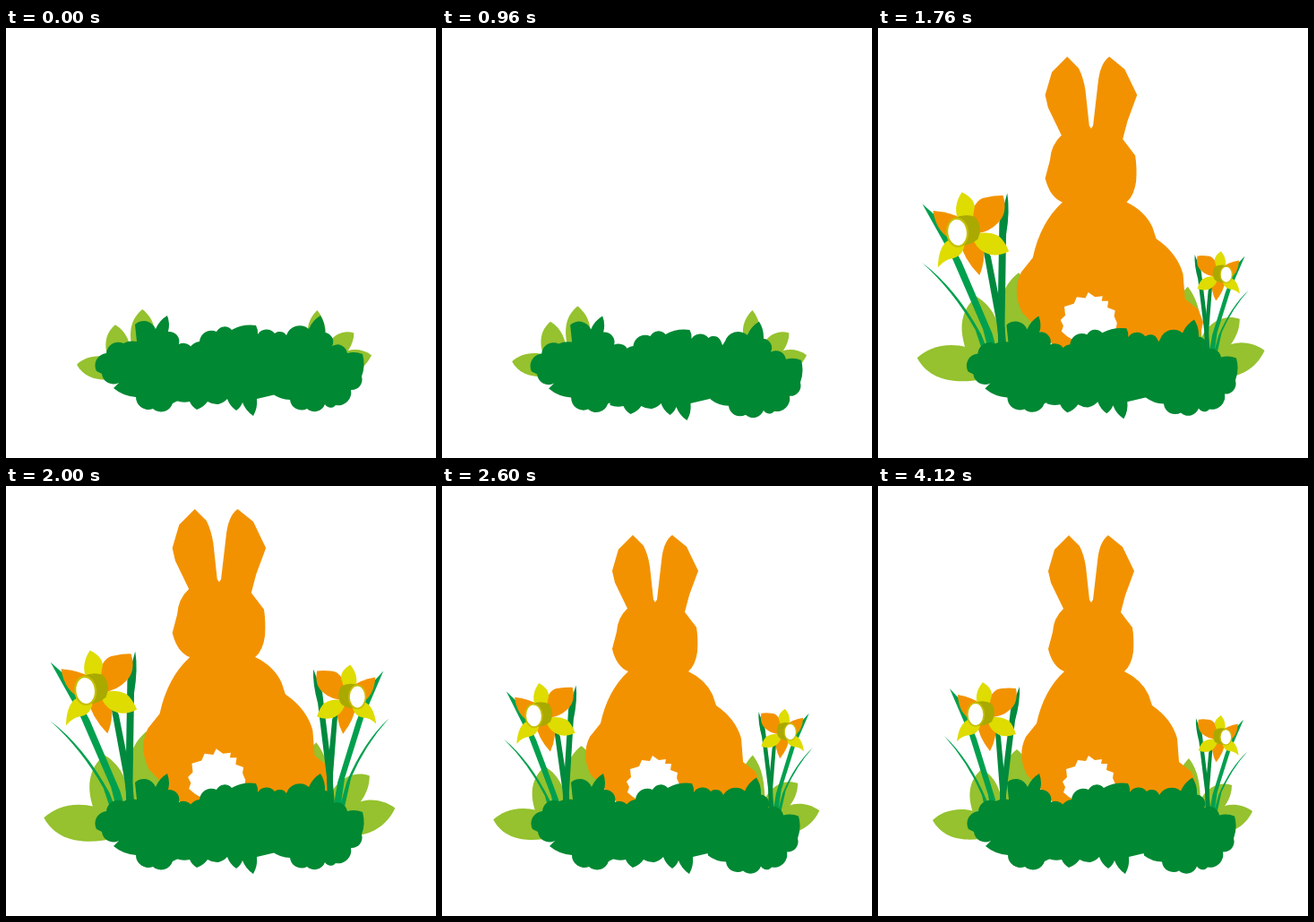
An HTML page for the animation above (4160 ms loop, 480x480 px).

```html
<!DOCTYPE html>
<html lang="en">
<head>
<meta charset="utf-8">
<title>Spring bunny</title>
<style>
  html, body { margin: 0; height: 100%; overflow: hidden; background: #fff; }
  svg { display: block; width: 100vw; height: 100vh; }
</style>
</head>
<body>
<svg viewBox="0 0 480 480">
  <defs>
    <g id="flower">
      <g fill="#00a04e">
        <path d="M80 226L93 240L110 282L131 350L138 392H130L123 345L101 275Z"/>
        <path d="M74 279Q102 305 121 350L132 390H126L116 345Q100 308 74 279Z"/>
      </g>
      <g fill="#008a3e">
        <path d="M158 224Q159 240 153 262L143 345L139 390H133L137 340L148 250Z"/>
        <path d="M130 262L137 280L143 345L142 390H137L136 340Z"/>
      </g>
      <g fill="#f39200">
        <path d="M120 250Q126 226 138 226Q147 225 154 226Q157 242 147 250Q138 258 125 258Z"/>
        <path d="M89 233Q106 236 116 244L105 262Q90 254 89 233Z"/>
        <path d="M110 262Q112 280 125 296Q134 280 131 258Z"/>
      </g>
      <g fill="#dedc00">
        <path d="M112 247Q106 232 117 219Q128 226 127 234L123 248Z"/>
        <path d="M122 260Q134 255 146 262Q151 267 154 277Q141 282 132 276Q124 271 122 260Z"/>
        <path d="M88 285Q91 262 104 260L115 262Q114 276 103 278Q95 278 88 285Z"/>
      </g>
      <path fill="#aaa900" d="M107 242Q118 238 127 243Q133 253 127 263Q119 269 108 267Z"/>
      <ellipse cx="109" cy="255" rx="9.3" ry="12.8" fill="#fff" stroke="#c6bf00" stroke-width="1.8"/>
    </g>
  </defs>
  <g fill="#95c22e">
    <g id="leavesL">
      <path d="M61 373C74 361 97 355 125 370V392C102 397 74 397 61 373Z"/>
      <path d="M116 316C102 328 98 345 108 370L140 365C138 340 132 326 116 316Z"/>
      <path d="M155 294C140 306 132 325 143 360H165C180 330 172 308 155 294Z"/>
    </g>
    <g id="leavesR">
      <path d="M347 304C333 318 330 335 342 360H360C360 335 358 318 347 304Z"/>
      <path d="M395 334C375 327 355 345 355 372H372C385 362 395 350 395 334Z"/>
      <path d="M418 363C398 349 375 357 365 375L380 388C400 387 412 376 418 363Z"/>
    </g>
  </g>
  <g id="rabbit">
    <path fill="#f39200" d="M213 55L225 67Q230 77 232 90L236 127L238 130L240 127L245 84Q247 62 257 55L273 68L286 95L276 122L271 141L284 158Q286 170 285 185Q283 200 275 207Q294 216 302 233L306 245Q328 260 334 282L336 308L350 319L355 332L348 365H210L200 358L166 322Q155 300 165 280L177 265Q185 228 208 207Q195 202 190 182L195 163Q196 147 207 137L193 108L190 95L197 71Z"/>
    <path fill="#fff" d="M213 347L207 342L209 336L206 330L211 325L210 316L220 313L223 306L232 307L235 301L242 306L250 305L249 310L256 310L255 317L263 320L262 326L265 333L262 350H218Z"/>
  </g>
  <use id="flowerL" href="#flower"/>
  <g id="flowerR"><use href="#flower" transform="matrix(-.68 0 0 .68 462.4 107)"/></g>
  <g id="bush" fill="#008833"></g>
</svg>
<script>
const $ = id => document.getElementById(id);
const LOOP = 4160, STEP = 40;

// Outward arcs between notches; "~" marks a flatter edge, "-" a straight one.
function scallop(points) {
  const list = points.split(' ').map(p => {
    const [x, y] = p.replace(/[~-]/, '').split(',').map(Number);
    return { x, y, bend: p.includes('-') ? 0 : p.includes('~') ? 1.6 : 0.6 };
  });
  let prev = list[list.length - 1];
  let d = `M${prev.x} ${prev.y}`;
  for (const p of list) {
    const r = Math.hypot(p.x - prev.x, p.y - prev.y) * p.bend;
    d += `A${r} ${r} 0 0 1 ${p.x} ${p.y}`;
    prev = p;
  }
  const path = document.createElementNS('http://www.w3.org/2000/svg', 'path');
  path.setAttribute('d', d + 'Z');
  return $('bush').appendChild(path);
}

const bushL = scallop('101,383- 112,363 131,352 146,350~ 144,331- 167,336 180,321~ 181,339~ 193,353 209,362 ' +
  '225,368- 225,400- 190,417- 186,419- 164,425 145,412 120,402~ 126,396- 107,386');
const bushM = scallop('205,372- 216,350 235,339 252,337 279,332~ 281,342~ 300,341 314,345 ' +
  '325,375- 318,405- 297,410- 280,414- 276,433~ 264,418~ 257,427~ 247,414~ 237,420~ 225,417~ ' +
  '213,426~ 205,417~ 190,416~ 190,375-');
const bushR = scallop('313,343- 338,336 351,321~ 356,340~ 364,355 381,363 398,364~ 397,389~ ' +
  '385,404 368,421 356,420 336,425 317,415 297,408~ 292,375-');

// Interpolates [time, value] keys with a sine ease.
function tween(t, ...keys) {
  if (t <= keys[0][0]) return keys[0][1];
  for (let i = 1; i < keys.length; i++) {
    const [t0, a] = keys[i - 1], [t1, b] = keys[i];
    if (t < t1) return a + (b - a) * (1 - Math.cos(Math.PI * (t - t0) / (t1 - t0))) / 2;
  }
  return keys[keys.length - 1][1];
}

const set = (el, value) => el.setAttribute('transform', value);
const move = (x, y) => `translate(${x} ${y})`;
const grow = (x, y, s) => `translate(${x} ${y}) scale(${s}) translate(${-x} ${-y})`;
const turn = (x, y, angle) => `rotate(${angle} ${x} ${y})`;

function draw(t) {
  // The bush rustles until the bunny is up.
  const shake = Math.max(0, Math.min(1, t / 300, (1960 - t) / 300));
  const wave = Math.sin(2 * Math.PI * t / 400);
  set(bushL, move(shake * (1.6 * wave - 1.8), shake * (1.9 * wave - 0.5)));
  set(bushM, move(-2.5 * shake, 5 * shake));
  set(bushR, move(shake * 5 * wave, shake * (6.5 + wave / 2) + tween(t, [2000, 0], [2200, 4.5])));

  set($('leavesL'), move(shake * (wave - 1.5), shake * (wave - 4)) +
    grow(143, 385, tween(t, [1350, 0.78], [1850, 1.24], [2900, 1])));
  set($('leavesR'), move(shake * (wave - 1.5), 0) +
    grow(350, 378, tween(t, [1350, 0.853], [1870, 1.25], [2900, 1])));

  set($('rabbit'), grow(239, 388, tween(t, [1321, 0], [1813, 1.1], [2640, 1])));

  set($('flowerL'), grow(138, 390, tween(t, [1305, 0], [1815, 1.26], [2560, 1])) +
    turn(130, 365, tween(t, [2000, -6], [3320, 0])));
  set($('flowerR'), grow(380, 375, tween(t, [1440, 0], [1940, 1.48], [2800, 1])) +
    turn(368, 362, tween(t, [2600, 0], [3240, -8.5], [4120, 0])));
}

function frame() {
  const t = performance.now() % LOOP;
  draw(Math.floor(t / STEP) * STEP);
  requestAnimationFrame(frame);
}
frame();
</script>
</body>
</html>
```
